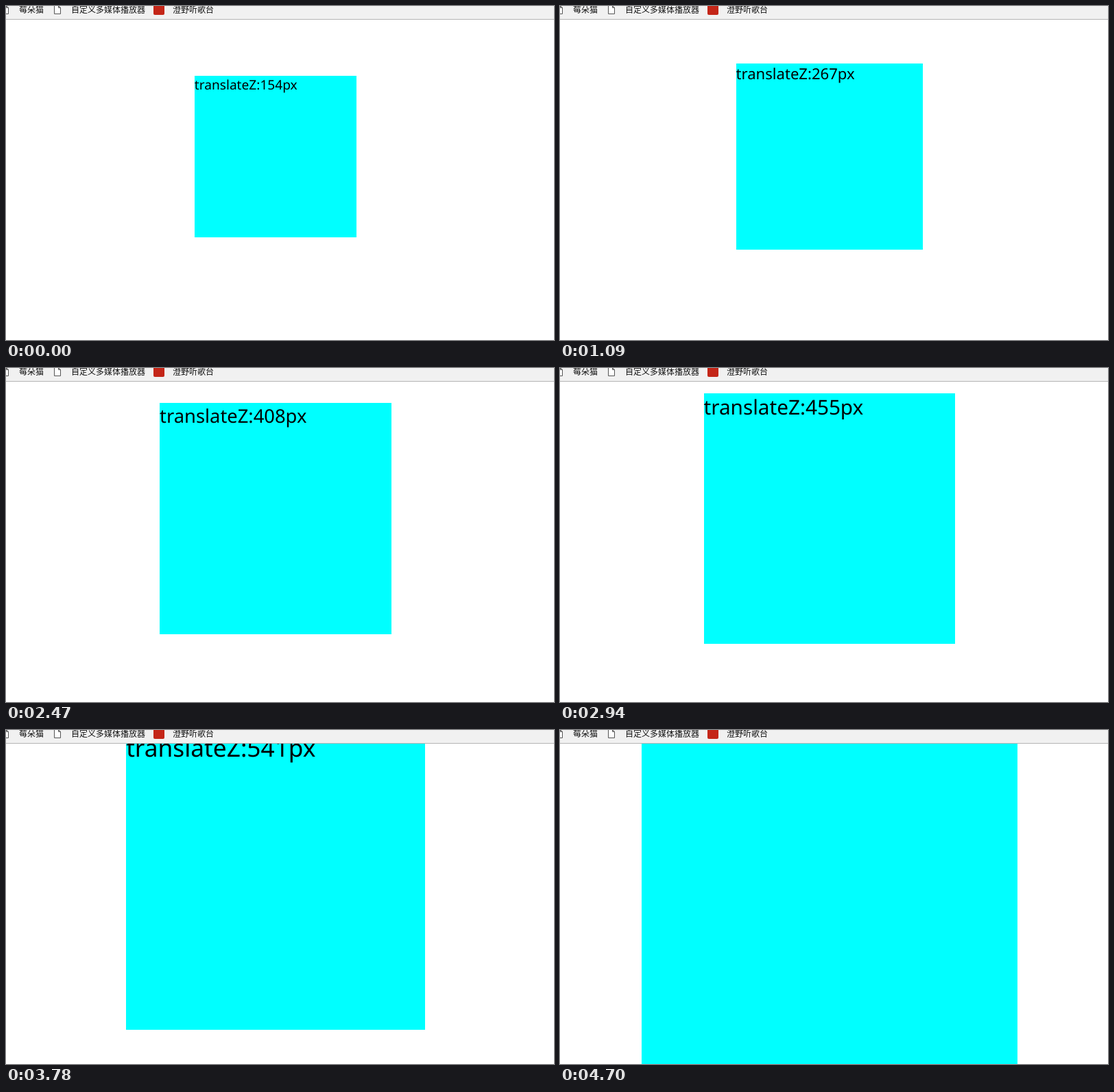
These frames come from a looping animation (799 by 488 pixels, 4.78 s). An HTML page:

```html
<!DOCTYPE html>
<html lang="zh">
<head>
<meta charset="utf-8">
<title>translateZ</title>
<style>
  html, body { margin: 0; height: 100%; overflow: hidden; background: #fff; }
  svg { display: block; width: 799px; height: 488px; }
  #box rect { fill: #0ff; shape-rendering: crispEdges; }
  #label { font: 16.2px "Noto Sans", sans-serif; text-rendering: geometricPrecision; }
  #bar text { font: 12px "Noto Sans CJK SC", "Noto Sans CJK", sans-serif; fill: #111; }
  #page { fill: #fff; stroke: #555; }
</style>
</head>
<body>
<svg viewBox="0 0 799 488">
  <defs><path id="page" d="M.5 -.5h6l3 3v9h-9zM6.5 -.5v3h3"/></defs>
  <g id="box">
    <rect width="200" height="200"/>
    <text id="label" y="17"></text>
  </g>
  <g id="bar">
    <rect width="799" height="19" fill="#f1f1f1"/>
    <rect y="19" width="799" height="1" fill="#b4b4b4"/>
    <use href="#page" x="-6"/>
    <text x="19" y="10">莓朵猫</text>
    <use href="#page" x="70"/>
    <text x="95" y="10">自定义多媒体播放器</text>
    <rect x="215" y="-3" width="16" height="16" rx="2" fill="#c42618"/>
    <text x="243" y="10">澄野听歌台</text>
  </g>
</svg>
<script>
  const LOOP = 4780, STEPS = 62, PERSPECTIVE = 1000;
  const STEP_MS = LOOP / STEPS, LEAD_MS = 8;
  const box = document.getElementById('box');
  const label = document.getElementById('label');

  // Constant speed towards the viewer, after a slightly larger first step.
  const depth = step => Math.round(157.7 + 7.83 * step - 3.7 * Math.exp(-step));

  function draw(time) {
    const step = Math.min(STEPS - 1, Math.floor((time % LOOP + LEAD_MS) / STEP_MS));
    const z = depth(step);
    const scale = PERSPECTIVE / (PERSPECTIVE - z);
    box.setAttribute('transform', `translate(393 220) scale(${scale}) translate(-100 -100)`);
    label.textContent = `translateZ:${z}px`;
  }

  const origin = performance.now();
  (function tick() {
    draw(performance.now() - origin);
    requestAnimationFrame(tick);
  })();
</script>
</body>
</html>
```
